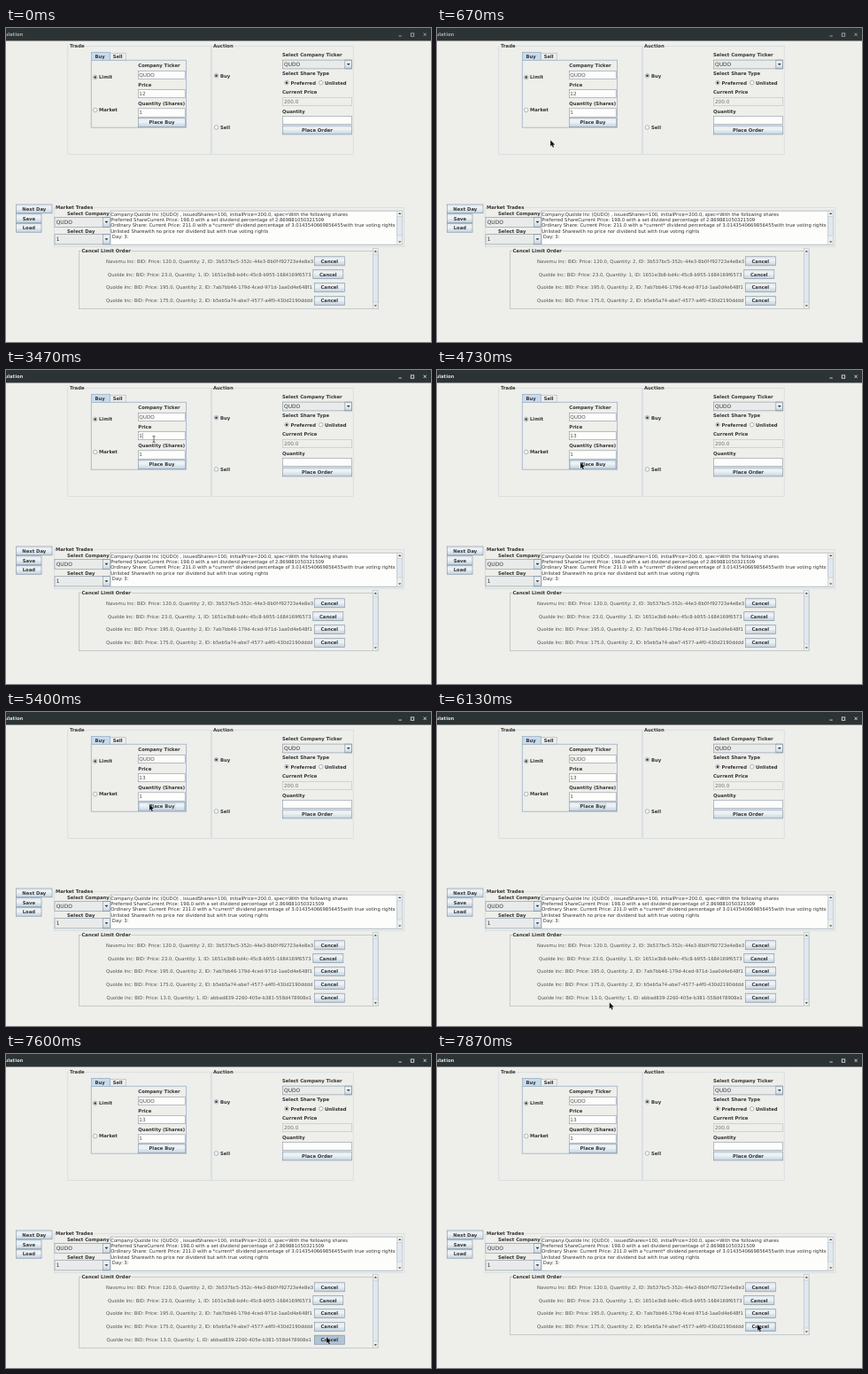
An HTML page with a canvas for the animation above (8000 ms loop, 480x354 px).

```html
<!DOCTYPE html>
<html lang="en">
<head>
<meta charset="utf-8">
<title>Trading simulation</title>
<style>
  html, body { margin: 0; width: 100%; height: 100%; overflow: hidden; background: #eeeeea; }
  canvas { display: block; width: 480px; height: 354px; }
</style>
</head>
<body>
<canvas id="stage"></canvas>
<script>
const LOOP = 8000, TICK = 1000 / 15;
const canvas = document.getElementById('stage');
const ctx = canvas.getContext('2d');
const dpr = window.devicePixelRatio || 1;
canvas.width = 480 * dpr;
canvas.height = 354 * dpr;

const FACE = '"DejaVu Sans", sans-serif';
const PAPER = '#eeeeea', EDGE = '#8593a1', FAINT = '#ccd6dd', INK = '#333', DIM = '#505050';
const TICKER = 'QUDO';
const PRICE_X = 150.3;

const ORDERS = [
  [113, 'Navomu Inc: BID: Price: 120.0, Quantity: 2, ID: 3b537bc5-352c-44e3-8b0f-f92723e4e8e3'],
  [115, 'Quolde Inc: BID: Price: 23.0, Quantity: 1, ID: 1651e3b8-bd4c-45c8-b955-1684169f6573'],
  [113, 'Quolde Inc: BID: Price: 195.0, Quantity: 2, ID: 7ab7bb46-179d-4ced-971d-1aa0d4e648f1'],
  [113, 'Quolde Inc: BID: Price: 175.0, Quantity: 2, ID: b5eb5a74-abe7-4577-a4f0-430d2190dddd'],
  [113.5, 'Quolde Inc: BID: Price: 13.0, Quantity: 1, ID: abbad839-2260-405e-b381-558d478908e1']
];

const DETAILS = [
  `Company:Quolde Inc (${TICKER}) , issuedShares=100, initialPrice=200.0, spec=With the following shares`,
  'Preferred ShareCurrent Price: 198.0 with a set dividend percentage of 2.869881050321509',
  'Ordinary Share: Current Price: 211.0 with a *current* dividend percentage of 3.0143540669856455with true voting rights',
  'Unlisted Sharewith no price nor dividend but with true voting rights',
  ' Day: 3:'
];

// Pointer path: time, x, y
const PATH = [
  [133, 3, 211], [400, 52, 181], [733, 147, 113], [933, 121, 133],
  [1000, 138, 119], [1067, 155, 105], [1133, 167, 78.9], [1200, 167, 79.5],
  [1333, 167, 79.5], [1400, 167, 78.6], [1533, 167, 78],
  [4067, 167, 78], [4333, 165, 85], [4667, 162, 104], [5400, 162, 104],
  [5600, 166, 138], [5867, 180, 240], [6067, 192, 316], [6133, 194.5, 327.5],
  [6200, 211, 328], [6333, 247, 331], [6533, 300, 328], [6800, 354, 321],
  [6933, 362, 319], [7600, 362, 319], [7867, 362, 305]
];

// Price field edits: time, text
const EDITS = [[0, '12'], [2800, '1'], [3000, ''], [3467, '1'], [4000, '13']];
const CARET_ON = [[1733, 2267], [2800, 4533], [5000, 5133]];

const FIELDS = [[149, 48, 53.5, 10], [149, 69, 53.5, 10], [149, 90.5, 53.5, 10]];

const within = (t, [from, to]) => t >= from && t < to;
const inside = (p, x, y, w, h) => p && p.x >= x && p.x <= x + w && p.y >= y && p.y <= y + h;

function pointerAt(t) {
  if (t < PATH[0][0]) return null;
  const i = PATH.findIndex(k => k[0] > t);
  if (i < 0) return { x: PATH.at(-1)[1], y: PATH.at(-1)[2] };
  const a = PATH[i - 1], b = PATH[i];
  const f = (t - a[0]) / (b[0] - a[0]);
  return { x: a[1] + (b[1] - a[1]) * f, y: a[2] + (b[2] - a[2]) * f };
}

function text(str, x, midY, { bold = false, size = 5.28, color = INK, align = 'left' } = {}) {
  ctx.font = `${bold ? 'bold ' : ''}${size}px ${FACE}`;
  ctx.textAlign = align;
  ctx.fillStyle = color;
  ctx.fillText(str, x, midY + 1.9);
}

const label = (str, x, y) => text(str, x, y, { bold: true });

function fill(x, y, w, h, color) {
  ctx.fillStyle = color;
  ctx.fillRect(x, y, w, h);
}

function frame(x, y, w, h, color = EDGE, width = 0.6) {
  ctx.strokeStyle = color;
  ctx.lineWidth = width;
  ctx.strokeRect(x + 0.3, y + 0.3, w - 0.6, h - 0.6);
}

function gloss(x, y, w, h) {
  const g = ctx.createLinearGradient(0, y, 0, y + h);
  g.addColorStop(0, '#dce6ee');
  g.addColorStop(0.4, '#f0f4f6');
  g.addColorStop(1, '#bfd0df');
  fill(x, y, w, h, g);
}

function button(str, x, y, w, h, state = {}) {
  if (state.pressed) fill(x, y, w, h, '#b0c4d5');
  else gloss(x, y, w, h);
  frame(x, y, w, h);
  if (state.hover && !state.pressed) frame(x + 0.6, y + 0.6, w - 1.2, h - 1.2, '#a9bfd4', 0.8);
  const mid = x + w / 2;
  text(str, mid, y + h / 2, { bold: true, align: 'center' });
  if (state.focus) {
    const tw = ctx.measureText(str).width + 1.6;
    frame(mid - tw / 2, y + 2, tw, h - 4, '#a3b8cc', 0.45);
  }
}

function field(str, [x, y, w, h], readOnly) {
  fill(x, y, w, h, readOnly ? PAPER : '#fdfdfb');
  frame(x, y, w, h, readOnly ? '#b9c1c8' : EDGE);
  text(str, x + 1.3 + (readOnly ? 0.7 : 0), y + h / 2 - 0.1, { size: 5.7, color: readOnly ? '#707070' : DIM });
}

function triangle(x, y, r, dir) {
  ctx.fillStyle = INK;
  ctx.beginPath();
  ctx.moveTo(x - r, y - dir * r / 2);
  ctx.lineTo(x + r, y - dir * r / 2);
  ctx.lineTo(x, y + dir * r / 2);
  ctx.fill();
}

function combo(str, x, y, w, h) {
  fill(x, y, w, h, '#e9ebea');
  gloss(x + w - 8.5, y, 8.5, h);
  frame(x, y, w, h);
  frame(x + w - 8.5, y, 8.5, h);
  text(str, x + 2, y + h / 2, { size: 5.9 });
  triangle(x + w - 4.2, y + h / 2, 2.1, 1);
}

function radio(str, x, y, textX, on) {
  ctx.beginPath();
  ctx.arc(x, y, 2.3, 0, 7);
  ctx.fillStyle = '#f4f6f7';
  ctx.fill();
  ctx.strokeStyle = EDGE;
  ctx.lineWidth = 0.6;
  ctx.stroke();
  if (on) {
    ctx.beginPath();
    ctx.arc(x, y, 1.3, 0, 7);
    ctx.fillStyle = INK;
    ctx.fill();
  }
  label(str, textX, y);
}

function group(title, x, y, w, h, titleX, color = FAINT) {
  frame(x, y, w, h, color, 0.6);
  ctx.font = `bold 5.28px ${FACE}`;
  fill(titleX - 0.6, y - 2, ctx.measureText(title).width + 1.2, 4, PAPER);
  label(title, titleX, y + 0.3);
}

function scrollbar(x, y, w, h, thumbH) {
  fill(x, y, w, h, PAPER);
  frame(x, y, w, h, '#b4bec7');
  triangle(x + w / 2, y + 3.3, 1.6, -1);
  triangle(x + w / 2, y + h - 3.3, 1.6, 1);
  fill(x + 0.5, y + 6.5, w - 1, thumbH, '#e2e9ee');
  frame(x, y + 6.5, w, thumbH, '#b4c2d0', 0.5);
}

function titleBar(active) {
  fill(0, 0, 480, 14.5, '#2c3335');
  const color = active ? '#dcdcdc' : '#a4a8a9';
  text('Simulation', 19.3, 7.2, { bold: true, color, align: 'right' });
  fill(443.4, 8.6, 3.4, 0.9, color);
  frame(457, 5.6, 4, 4, color, 0.9);
  ctx.beginPath();
  ctx.moveTo(471.6, 5.7); ctx.lineTo(474.7, 9);
  ctx.moveTo(474.7, 5.7); ctx.lineTo(471.6, 9);
  ctx.stroke();
}

function tradePanel(t, p) {
  group('Trade', 69.5, 20, 162, 122.7, 72);
  fill(117, 28, 18.5, 8, PAPER);
  frame(117, 28, 18.5, 8.5, '#a9b5c0');
  frame(96, 36, 107.8, 76.5, '#a4b8cd', 0.9);
  fill(96, 27, 21.5, 9.8, '#c8dbec');
  frame(96, 27, 21.5, 9.8, '#93a8bd');
  label('Buy', 100.5, 31.8);
  label('Sell', 120.7, 32);

  radio('Limit', 100.7, 55.5, 105, true);
  radio('Market', 100.7, 92.5, 105, false);

  const price = EDITS.findLast(e => t >= e[0])[1];
  label('Company Ticker', 149.3, 42.3);
  label('Price', 149.3, 63.6);
  label('Quantity (Shares)', 149.3, 84.9);
  [TICKER, price, '1'].forEach((s, i) => field(s, FIELDS[i]));
  if (CARET_ON.some(span => within(t, span))) {
    ctx.font = `5.7px ${FACE}`;
    fill(PRICE_X + ctx.measureText(price).width, 71, 0.5, 6.5, DIM);
  }

  button('Place Buy', 149.3, 101, 53.3, 11, {
    hover: inside(p, 149.3, 101, 53.3, 11),
    pressed: within(t, [5133, 5400]),
    focus: within(t, [5133, 7400])
  });
}

function auctionPanel() {
  group('Auction', 232, 20, 160.5, 122.7, 234);
  radio('Buy', 237.5, 53.7, 242, true);
  radio('Sell', 237.5, 112, 242, false);
  label('Select Company Ticker', 312, 30);
  combo(TICKER, 312, 35.8, 79, 10.4);
  label('Select Share Type', 312, 51.2);
  radio('Preferred', 317, 61.7, 321.5, true);
  radio('Unlisted', 355.7, 61.7, 360, false);
  label('Current Price', 312, 72.4);
  field('200.0', [312, 78, 79, 10], true);
  label('Quantity', 312, 93.8);
  field('', [312, 99, 79, 10]);
  button('Place Order', 312, 109.8, 79, 10.4);
}

function marketPanel() {
  button('Next Day', 11.3, 198.7, 41, 10.4);
  button('Save', 11.3, 209.4, 29, 10.4);
  button('Load', 11.3, 220.1, 29, 10.4);

  group('Market Trades', 54, 202, 396, 45, 56);
  label('Select Company', 69, 209.3);
  combo(TICKER, 54.7, 213, 63, 11.8);
  label('Select Day', 69, 228.7);
  combo('1', 54.7, 232.4, 63, 11.8);
  fill(117.7, 205.8, 330.3, 38.7, '#fdfdfb');
  frame(117.7, 205.8, 330.3, 38.7);
  DETAILS.forEach((line, i) => text(line, 118.2, 209.6 + i * 6.45));
  scrollbar(441.5, 205.8, 6.5, 38.7, 22);
}

function cancelPanel(t, p) {
  const count = within(t, [5400, 7800]) ? 5 : 4;
  const h = count === 5 ? 80.8 : 66;
  group('Cancel Limit Order', 82, 251, 338.7, h, 85.5, '#aab5be');
  scrollbar(414.3, 248.3, 6, h + 2.3, h - 11.5);
  for (let i = 0; i < count; i++) {
    const [x, str] = ORDERS[i];
    const y = 262.8 + i * 14.85;
    const bx = i === 1 ? 346.5 : 348;
    text(str, x, y, { color: DIM });
    button('Cancel', bx, y - 5.3, 34.6, 10.6, {
      hover: inside(p, bx, y - 5.3, 34.6, 10.6),
      pressed: i === 4 && t >= 7400,
      focus: i === 4 && t >= 7400
    });
  }
}

function pointer(p) {
  if (!p) return;
  ctx.save();
  ctx.translate(p.x, p.y);
  ctx.beginPath();
  if (FIELDS.some(f => inside(p, ...f))) {
    ctx.moveTo(-1.5, -3.3); ctx.lineTo(1.5, -3.3);
    ctx.moveTo(0, -3.3); ctx.lineTo(0, 3.3);
    ctx.moveTo(-1.5, 3.3); ctx.lineTo(1.5, 3.3);
    ctx.strokeStyle = '#333';
    ctx.lineWidth = 0.7;
    ctx.stroke();
  } else {
    [[0, 0], [0, 7], [1.6, 5.6], [2.7, 8.2], [3.9, 7.6], [2.8, 5.2], [5, 5]].forEach(q => ctx.lineTo(...q));
    ctx.closePath();
    ctx.strokeStyle = '#fff';
    ctx.lineWidth = 0.8;
    ctx.stroke();
    ctx.fillStyle = '#111';
    ctx.fill();
  }
  ctx.restore();
}

function draw(now) {
  // The screen refreshes in fixed ticks; the offset absorbs rounding.
  const t = Math.ceil(Math.floor((now % LOOP + 4) / TICK) * TICK);
  const p = pointerAt(t);
  ctx.setTransform(dpr, 0, 0, dpr, 0, 0);
  ctx.textRendering = 'geometricPrecision';
  fill(0, 0, 480, 354, PAPER);
  titleBar(t >= 1733);
  tradePanel(t, p);
  auctionPanel();
  marketPanel();
  cancelPanel(t, p);
  pointer(p);
}

const start = performance.now();
function loop() {
  draw(performance.now() - start);
  requestAnimationFrame(loop);
}
loop();
</script>
</body>
</html>
```
